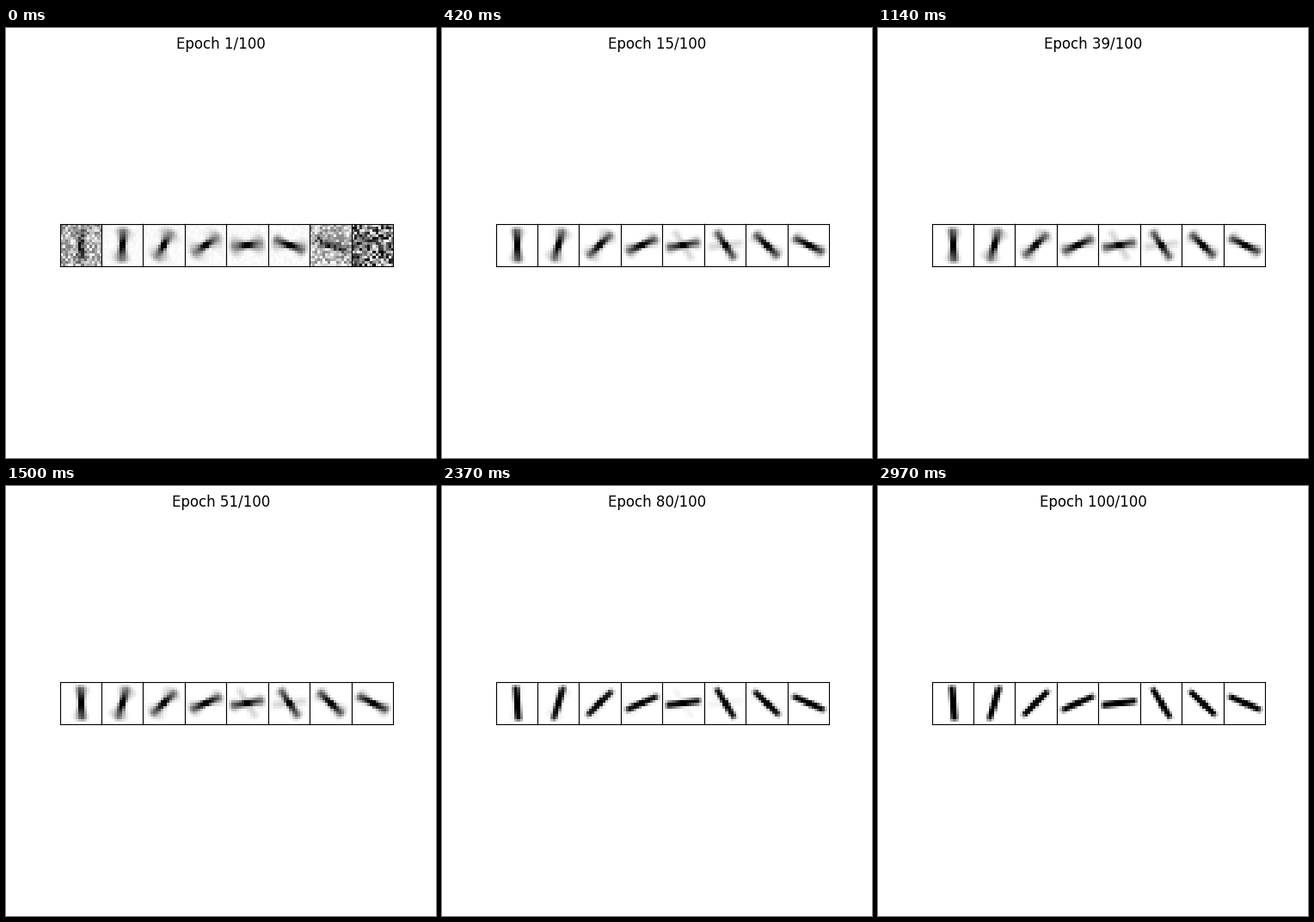
A matplotlib script for the animation above (3000 ms loop, 500 px wide and 500 px high).

```python
import numpy as np
import matplotlib.pyplot as plt
from matplotlib.animation import FuncAnimation

EPOCHS, SIZE = 100, 16
ANGLES = np.array([94.5, 73.6, 45, 23.5, 7, -59.5, -44, -23])
UNITS = len(ANGLES)
index = np.arange(UNITS)

axis = np.arange(SIZE) - (SIZE - 1) / 2
X, Y = np.meshgrid(axis, -axis)


def bar(angle):
    a = np.radians(angle)
    along = np.abs(X * np.cos(a) + Y * np.sin(a))
    across = np.abs(Y * np.cos(a) - X * np.sin(a))
    return np.clip(1.6 - across, 0, 1) * np.clip((7.5 - along) / 2, 0, 1)


def fan(angle, width):
    """Average of bars with a Gaussian spread of angles."""
    z = np.linspace(-2, 2, 9)
    weights = np.exp(-z**2 / 2)
    bars = [bar(angle + width * k) for k in z]
    return np.tensordot(weights / weights.sum(), bars, 1)


def chain(angles, width, pull):
    """Each unit blends its own fan with those of its neighbours."""
    h = pull ** (index[:, None] - index) ** 2.0
    fans = [fan(a, width) for a in angles]
    return np.tensordot(h / h.sum(axis=1, keepdims=True), fans, 1)


def first_units():
    rng = np.random.default_rng(4)
    noise = rng.random((UNITS, SIZE, SIZE))
    share = np.clip((np.abs(index - 3) - 2) / 2, 0.04, 1)[:, None, None]
    angles = np.clip(118 - 28 * index, -22, 90)
    return share * noise + (1 - share) * chain(angles, 13, 0.35)


start = first_units()


def units(epoch):
    early = np.exp(-epoch / 2)
    spread = 1 / (1 + np.exp((epoch - 76) / 2.2))
    settled = chain(ANGLES, 9 * spread, 0.25 * spread)
    return early * start + (1 - early) * settled


fig, axes = plt.subplots(1, UNITS, figsize=(5, 5), dpi=100,
                         gridspec_kw={"wspace": 0})
title = fig.suptitle("")
images = []
for ax, picture in zip(axes, start):
    ax.set(xticks=[], yticks=[])
    images.append(ax.imshow(picture, cmap="gray_r", interpolation="nearest"))


def update(epoch):
    title.set_text(f"Epoch {epoch + 1}/{EPOCHS}")
    for im, picture in zip(images, units(epoch)):
        im.set_data(picture)
        im.autoscale()
    return [title, *images]


anim = FuncAnimation(fig, update, frames=EPOCHS, interval=30,
                     repeat=True, repeat_delay=0, blit=False)
plt.show()
```
